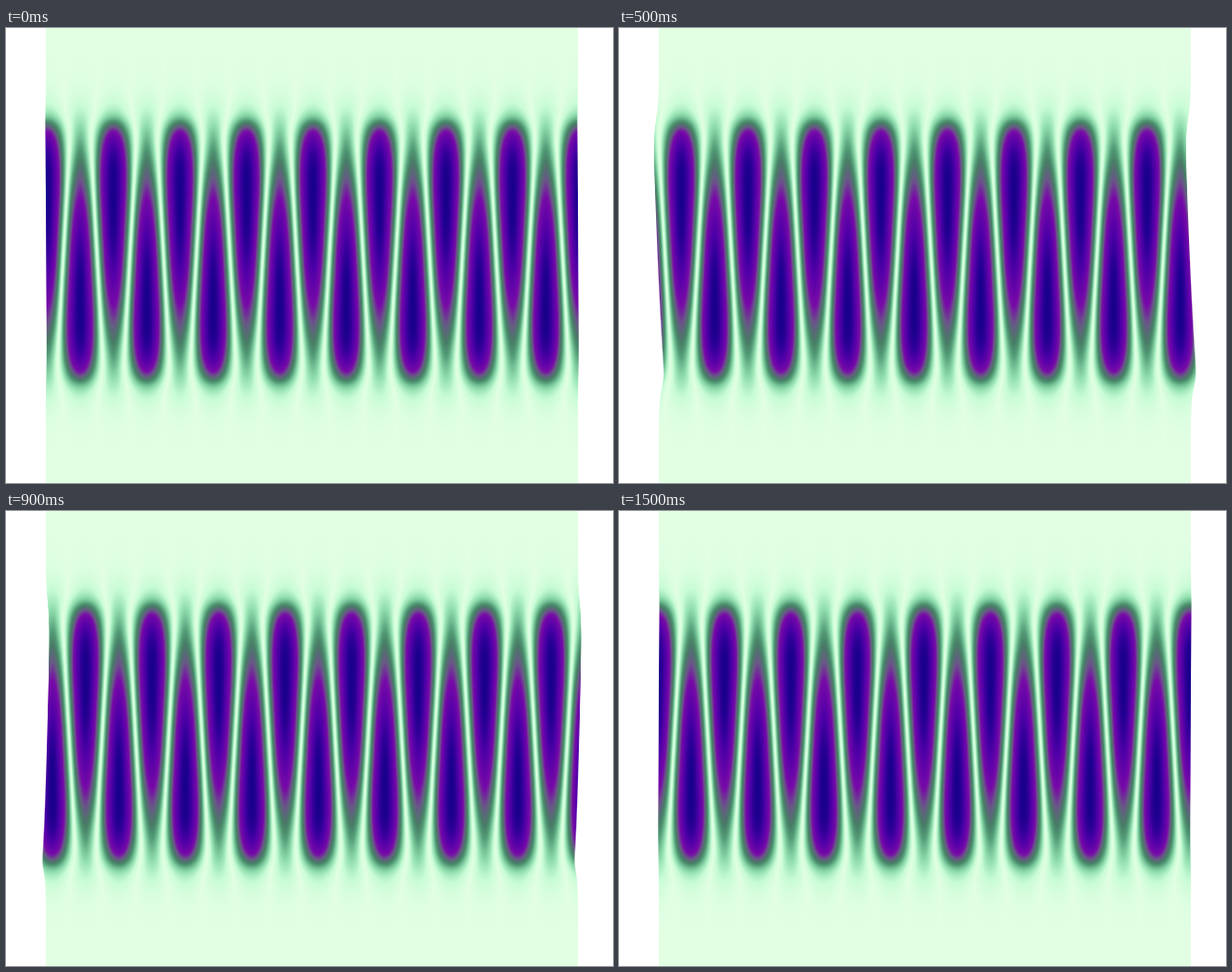
Animation, 640 px wide and 480 px high, one loop 1550 ms. Source, as a matplotlib script:

```python
import numpy as np
import matplotlib.pyplot as plt
from matplotlib.animation import FuncAnimation
from matplotlib.colors import LinearSegmentedColormap

W, H, DPI = 640, 480, 100
FRAMES, INTERVAL = 31, 50
LEFT, RIGHT, MID = 42, 603, 236
PERIOD = (RIGHT - LEFT) / 8
K = 2 * np.pi / PERIOD
CREST = 43.2     # x of an upper lobe at the start of the loop
SHEAR = 0.056    # sideways displacement per pixel of height
STRETCH = 1.2    # vertical displacement relative to incompressible flow
REACH, SOFT = 140, 9   # where the displacement dies out, and how gently
CORE = 110       # half height of the undisturbed layer

cmap = LinearSegmentedColormap.from_list("wave", [
    (0.00, "#e2ffe4"), (0.06, "#c8fcd6"), (0.13, "#91deaf"),
    (0.24, "#529b76"), (0.31, "#487d66"), (0.43, "#695887"),
    (0.56, "#780aa8"), (0.80, "#5000a8"), (1.00, "#19008c"),
], N=1024)


def displacement():
    """Sideways and vertical amplitudes against height."""
    s = np.arange(-300, 300, 0.5)
    sway = -SHEAR * s / (1 + np.exp((np.abs(s) - REACH) / SOFT))
    lift = -STRETCH * K * np.cumsum(sway) * 0.5
    return s, sway, lift


def wave_period(columns=700, steps=40):
    """Field strength and sideways shift over one period of the wave."""
    heights, sway, lift = displacement()
    x_out, s_out = np.meshgrid(np.arange(columns) / columns * PERIOD,
                               np.arange(H) + 0.5 - MID)
    x, s = x_out, s_out
    for _ in range(steps):  # trace each point back to its rest position
        dx = np.interp(s, heights, sway) * np.sin(K * x)
        ds = np.interp(s, heights, lift) * np.cos(K * x)
        x, s = x_out - dx, s_out - ds
    strength = np.abs(np.cos(K * x)) * np.exp(-np.abs(s / CORE) ** 3)
    return strength, dx


strength, shift = wave_period()
colors = cmap(strength)[..., :3]
px = np.arange(W) + 0.5


def render(n):
    crest = CREST + PERIOD * n / FRAMES
    count = strength.shape[1]
    col = np.rint((px - crest) / PERIOD * count).astype(int) % count
    x = px - shift[:, col]
    cover = np.clip(np.minimum(x - LEFT, RIGHT - x) + 0.5, 0, 1)[..., None]
    return 1 - cover * (1 - colors[:, col])


fig = plt.figure(figsize=(W / DPI, H / DPI), dpi=DPI, facecolor="white")
ax = fig.add_axes([0, 0, 1, 1])
ax.axis("off")
image = ax.imshow(render(0), interpolation="nearest", aspect="auto")


def update(n):
    image.set_data(render(n))
    return [image]


anim = FuncAnimation(fig, update, frames=FRAMES, interval=INTERVAL,
                     repeat=True, repeat_delay=0, blit=False)
plt.show()
```
